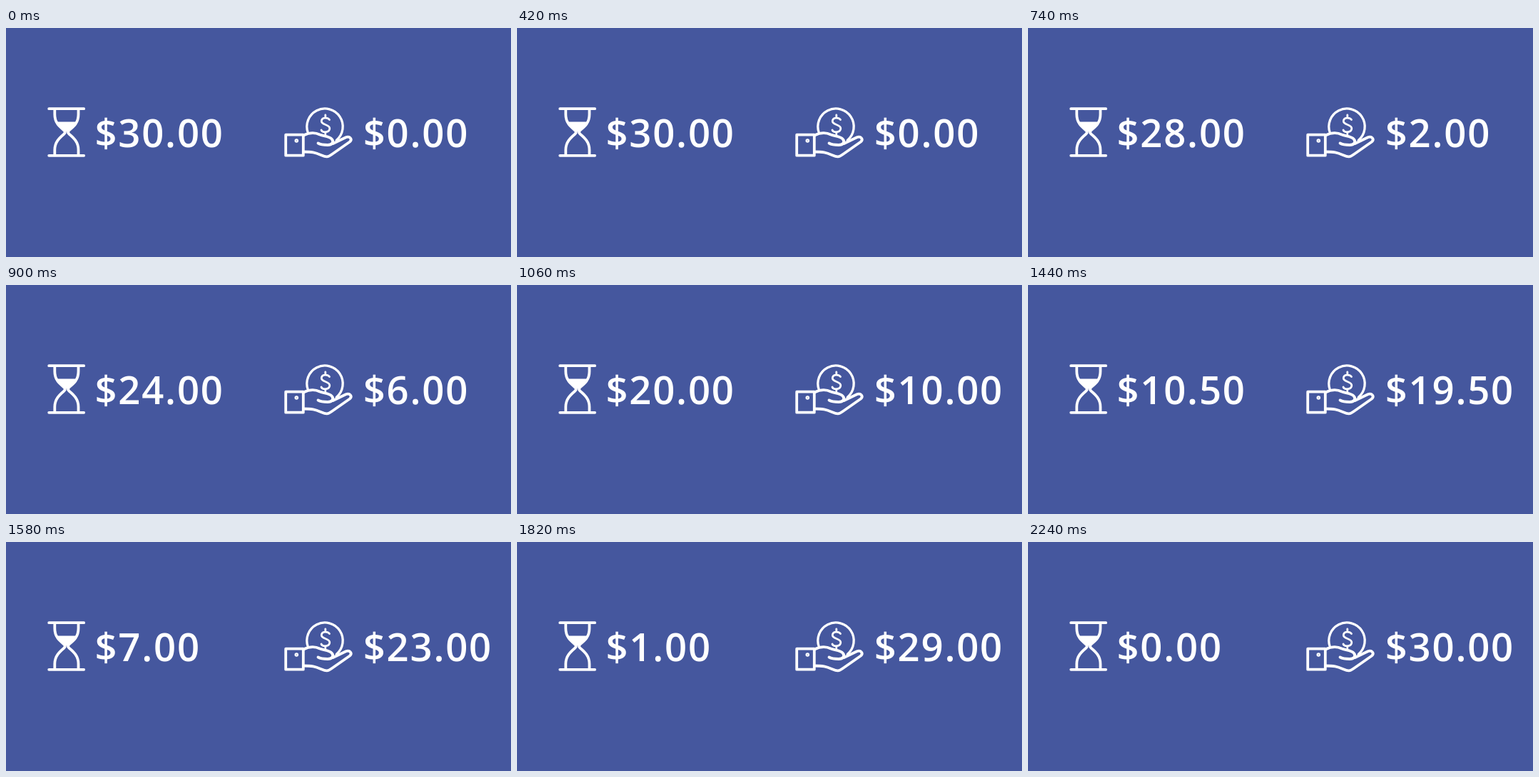
An HTML page that plays this animation: 708 px wide and 321 px high, repeating every 2.4 s.

```html
<!DOCTYPE html>
<html lang="en">
<head>
<meta charset="utf-8">
<title>Balance counter</title>
<style>
  html, body {
    margin: 0;
    width: 100%;
    height: 100%;
    overflow: hidden;
    background: #45579e;
  }
  svg { display: block; width: 708px; height: 321px; }
  text {
    font: 600 54.5px "Open Sans", "Noto Sans", sans-serif;
    letter-spacing: 1.8px;
    fill: #fff;
    text-rendering: geometricPrecision;
  }
  .icon {
    fill: none;
    stroke: #fff;
    stroke-width: 3.8;
    stroke-linecap: round;
    stroke-linejoin: round;
  }
</style>
</head>
<body>
<svg viewBox="0 0 708 321">
  <g class="icon">
    <path d="M60.200 113.200H109.200M60.200 178.800H109.200"/>
    <path d="M68.300 114V121C68.300 133 75 138 81.500 143.500Q84 146 81.500 148.500C75 154 68.300 160 68.300 171V178"/>
    <path d="M101.500 114V121C101.500 133 95 138 88.300 143.500Q85.800 146 88.300 148.500C95 154 101.500 160 101.500 171V178"/>
    <path fill="#fff" stroke="none" d="M71.500 131.500H98.500C95 138 89 141 85 146C81 141 75 138 71.500 131.500Z"/>
  </g>
  <g class="icon">
    <path stroke-width="3.3" d="M423.400 147A25.200 25.200 0 1 1 463.200 157.500"/>
    <path stroke-width="2.8" d="M453.500 128.500C451 125 442.500 125 442.300 130.500C442.200 136.500 454 134.500 453.800 141C453.500 147 443.500 147 442 143M447.800 122V125M447.800 146V149"/>
    <rect x="392.200" y="149.700" width="24.600" height="29"/>
    <circle cx="407.300" cy="158" r="1.700" stroke-width="2.200"/>
    <path d="M417 150.500C425 146.500 433 146 440 149.500C446 152 453 151.500 457 156C460 160 457 164 451 164C446 164 441 163.500 437.500 161.500"/>
    <path d="M458.500 162L476.500 153.300C482 151 486 156 482 159.500L457 177C451 181.500 449 181.300 442 178.300C433 174.500 429 173.500 417 173.500"/>
  </g>
  <text id="left" x="124.400" y="167">$30.00</text>
  <text id="right" x="500.700" y="167">$0.00</text>
</svg>
<script>
  const LOOP = 2400, HOLD = 660, TICK = 20, TOTAL = 30, STEP = 0.5;
  const left = document.getElementById("left");
  const right = document.getElementById("right");
  const money = value => "$" + value.toFixed(2);
  const start = performance.now();

  function draw() {
    const time = (performance.now() - start) % LOOP;
    const ticks = Math.floor((time - HOLD) / TICK);
    const paid = Math.min(TOTAL, Math.max(0, ticks * STEP));
    left.textContent = money(TOTAL - paid);
    right.textContent = money(paid);
    requestAnimationFrame(draw);
  }
  draw();
</script>
</body>
</html>
```
